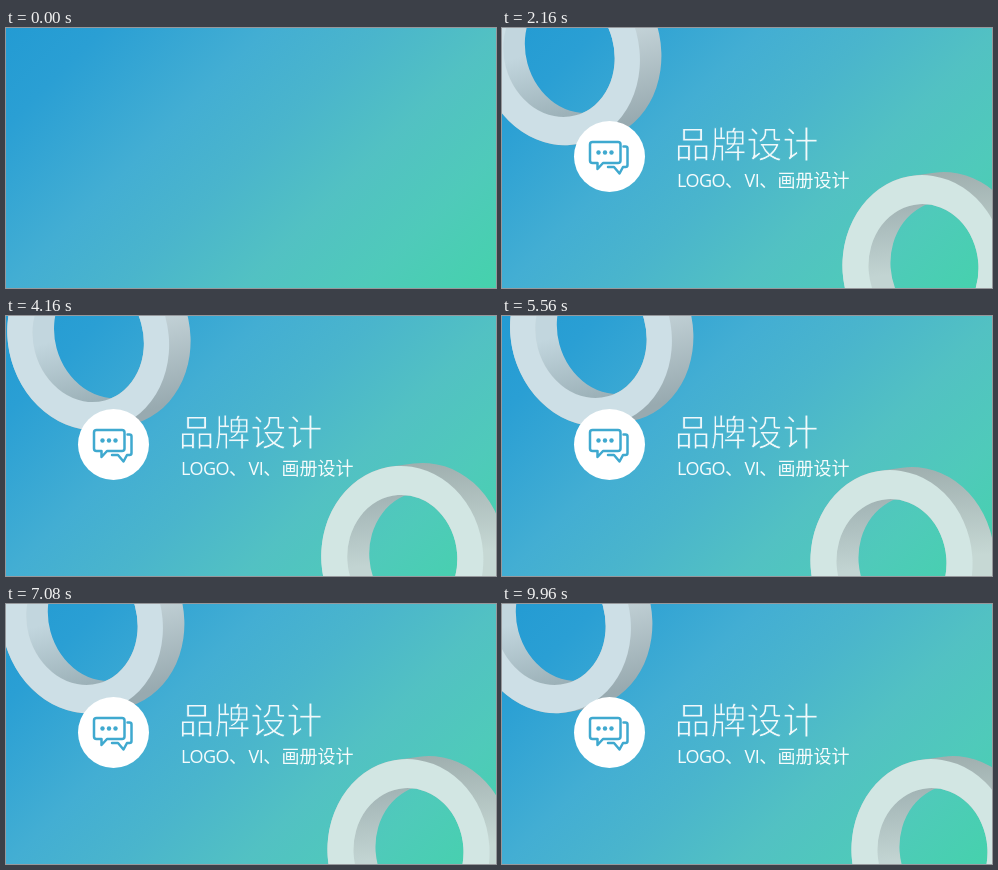
Recreate the animation shown at these times as an HTML page. Size 490 by 260 pixels, loop 10000 ms.

```html
<!DOCTYPE html>
<html lang="zh-CN">
<head>
<meta charset="utf-8">
<style>
html, body { margin: 0; width: 100%; height: 100%; overflow: hidden; }
body { background: #45aed3; }
svg { display: block; width: 490px; height: 260px; }
text { fill: #fff; font-family: "Noto Sans CJK SC", "Noto Sans CJK", sans-serif; font-weight: 400; }
.big { font-size: 36px; }
.latin { font-family: "Open Sans", "Noto Sans CJK SC", sans-serif; letter-spacing: -.5px; }
</style>
</head>
<body>
<svg viewBox="0 0 490 260" xmlns="http://www.w3.org/2000/svg">
  <defs>
    <linearGradient id="bg" gradientUnits="userSpaceOnUse" x1="57.5" y1="-57.5" x2="432.5" y2="317.5">
      <stop offset="0" stop-color="#239bd3"/>
      <stop offset=".13" stop-color="#2a9fd4"/>
      <stop offset=".35" stop-color="#43aed3"/>
      <stop offset=".5" stop-color="#4ab5cc"/>
      <stop offset=".66" stop-color="#52c1c3"/>
      <stop offset=".82" stop-color="#4fcaba"/>
      <stop offset="1" stop-color="#45d2ac"/>
    </linearGradient>
    <linearGradient id="sideA" x1="0" y1="0" x2="0" y2="1">
      <stop offset=".45" stop-color="#c5d4d9"/><stop offset=".95" stop-color="#98aab0"/>
    </linearGradient>
    <linearGradient id="wallA" x1="0" y1="0" x2="0" y2="1">
      <stop offset=".45" stop-color="#c2d6de"/><stop offset="1" stop-color="#9bb0b7"/>
    </linearGradient>
    <linearGradient id="sideB" x1="0" y1="0" x2="0" y2="1">
      <stop offset="0" stop-color="#9fafaf"/><stop offset=".5" stop-color="#c6d8d4"/>
    </linearGradient>
    <linearGradient id="wallB" x1="0" y1="0" x2="0" y2="1">
      <stop offset="0" stop-color="#a2b4b5"/><stop offset=".55" stop-color="#c2d4d2"/>
    </linearGradient>
    <!-- trims the glyph edges to a light weight -->
    <mask id="thin" maskUnits="userSpaceOnUse" x="160" y="80" width="180" height="70">
      <rect x="160" y="80" width="180" height="70" fill="#fff"/>
      <text class="big" x="172.5" y="130" style="fill:none" stroke="#000" stroke-width=".9">品牌设计</text>
    </mask>
  </defs>
  <rect width="490" height="260" fill="url(#bg)"/>
  <g id="rings"></g>
  <g id="icon">
    <circle r="35.5" fill="#fff"/>
    <g transform="translate(-107.5 -128.5)" fill="none" stroke="#3fa9cf" stroke-width="2.5" stroke-linejoin="round" stroke-linecap="round">
      <path d="M90.5 114h25.5q2.5 0 2.5 2.5v16q0 2.5-2.5 2.5h-15l-5.5 6v-6h-5q-2.5 0-2.5-2.5v-16q0-2.5 2.5-2.5z"/>
      <path d="M121.5 118.5h2q2 0 2 2v16.5q0 2-2 2h-2.5l-3.5 6.5-5.5-6.5h-6"/>
      <g fill="#3fa9cf" stroke="none">
        <circle cx="96.5" cy="124.5" r="2.2"/><circle cx="103" cy="124.5" r="2.2"/><circle cx="109.5" cy="124.5" r="2.2"/>
      </g>
    </g>
  </g>
  <g id="title"><text class="big" x="172.5" y="130" mask="url(#thin)">品牌设计</text></g>
  <text id="sub" class="latin" y="159" font-size="18"><tspan x="175">LOGO、</tspan><tspan x="242.5">VI、</tspan><tspan x="275.5" letter-spacing="0">画册设计</tspan></text>
</svg>
<script>
const $ = id => document.getElementById(id);
const LOOP = 10000;

const oval = (rx, ry) => `M${-rx} 0A${rx} ${ry} 0 1 1 ${rx} 0A${rx} ${ry} 0 1 1 ${-rx} 0Z`;

// Outline of an oval swept along (dx, dy)
function sweep(rx, ry, dx, dy) {
  const p = Math.atan2(-ry * dx, rx * dy);
  const x = rx * Math.cos(p), y = ry * Math.sin(p);
  return `M${x} ${y}l${dx} ${dy}A${rx} ${ry} 0 0 1 ${dx - x} ${dy - y}L${-x} ${-y}A${rx} ${ry} 0 0 1 ${x} ${y}Z`;
}

function ring({ id, rx, ry, hx, hy, depth, tilt, face }) {
  const a = -tilt * Math.PI / 180, [u, v] = depth;
  const dx = u * Math.cos(a) - v * Math.sin(a);
  const dy = u * Math.sin(a) + v * Math.cos(a);
  const hole = oval(hx, hy), area = 'x="-130" y="-130" width="260" height="260"';
  return `<g id="ring${id}"><g transform="rotate(${tilt})">
    <clipPath id="hole${id}"><path d="${hole}"/></clipPath>
    <mask id="mask${id}" maskUnits="userSpaceOnUse" ${area}>
      <rect ${area} fill="#fff"/>
      <g clip-path="url(#hole${id})"><path d="${hole}" transform="translate(${dx} ${dy})" fill="#000"/></g>
    </mask>
    <g mask="url(#mask${id})">
      <path d="${sweep(rx, ry, dx, dy)}" fill="url(#side${id})"/>
      <path d="${hole}" fill="url(#wall${id})"/>
    </g>
    <path d="${oval(rx, ry)}${hole}" fill-rule="evenodd" fill="${face}"/>
  </g></g>`;
}
$("rings").innerHTML =
  ring({ id: "A", rx: 80, ry: 93, hx: 55, hy: 64.5, depth: [21.5, -4], tilt: -15, face: "#cddfe6" }) +
  ring({ id: "B", rx: 81, ry: 92, hx: 55, hy: 63, depth: [22, -3], tilt: -4, face: "#d2e6e3" });

// Drift of the rings: time, x, y
const path = [
  [0, -18, 2], [2160, 9, 8], [3120, 23, 8.5], [4200, 34.5, 5],
  [5560, 41, 1], [7080, 28, 0], [8360, 12, 0], [9960, 0, 0], [10000, 0, 0]
];

function slope(i, k) {
  const a = path[Math.max(i - 1, 0)], b = path[Math.min(i + 1, path.length - 1)];
  return (b[k] - a[k]) / (b[0] - a[0]);
}

function drift(t, k) {
  let i = 0;
  while (i < path.length - 2 && t >= path[i + 1][0]) i++;
  const a = path[i], b = path[i + 1], h = b[0] - a[0], u = (t - a[0]) / h;
  const s = u * u * (3 - 2 * u);
  return a[k] + (b[k] - a[k]) * s
    + h * (slope(i, k) * u * (1 - u) ** 2 - slope(i + 1, k) * u * u * (1 - u));
}

const span = (t, a, b) => Math.min(1, Math.max(0, (t - a) / (b - a)));
const easeOut = u => 1 - (1 - u) ** 3;
const move = (id, x, y, s = 1) => $(id).setAttribute("transform", `translate(${x} ${y}) scale(${s})`);
const fade = (id, v) => $(id).setAttribute("opacity", v);

function draw(t) {
  const away = 1 - easeOut(span(t, 40, 1200));
  const x = drift(t, 1) - 170 * away, y = drift(t, 2) - 110 * away;
  move("ringA", 48 + x, 17 + y);
  move("ringB", 430.5 - x, 247 - y);
  const pop = easeOut(span(t, 400, 1100));
  move("icon", 107.5, 128.5, pop);
  fade("icon", pop);
  fade("title", 0.92 * span(t, 800, 1500));
  fade("sub", 0.95 * span(t, 1200, 1900));
}

function tick() {
  draw(performance.now() % LOOP);
  requestAnimationFrame(tick);
}
draw(0);
requestAnimationFrame(tick);
</script>
</body>
</html>
```
